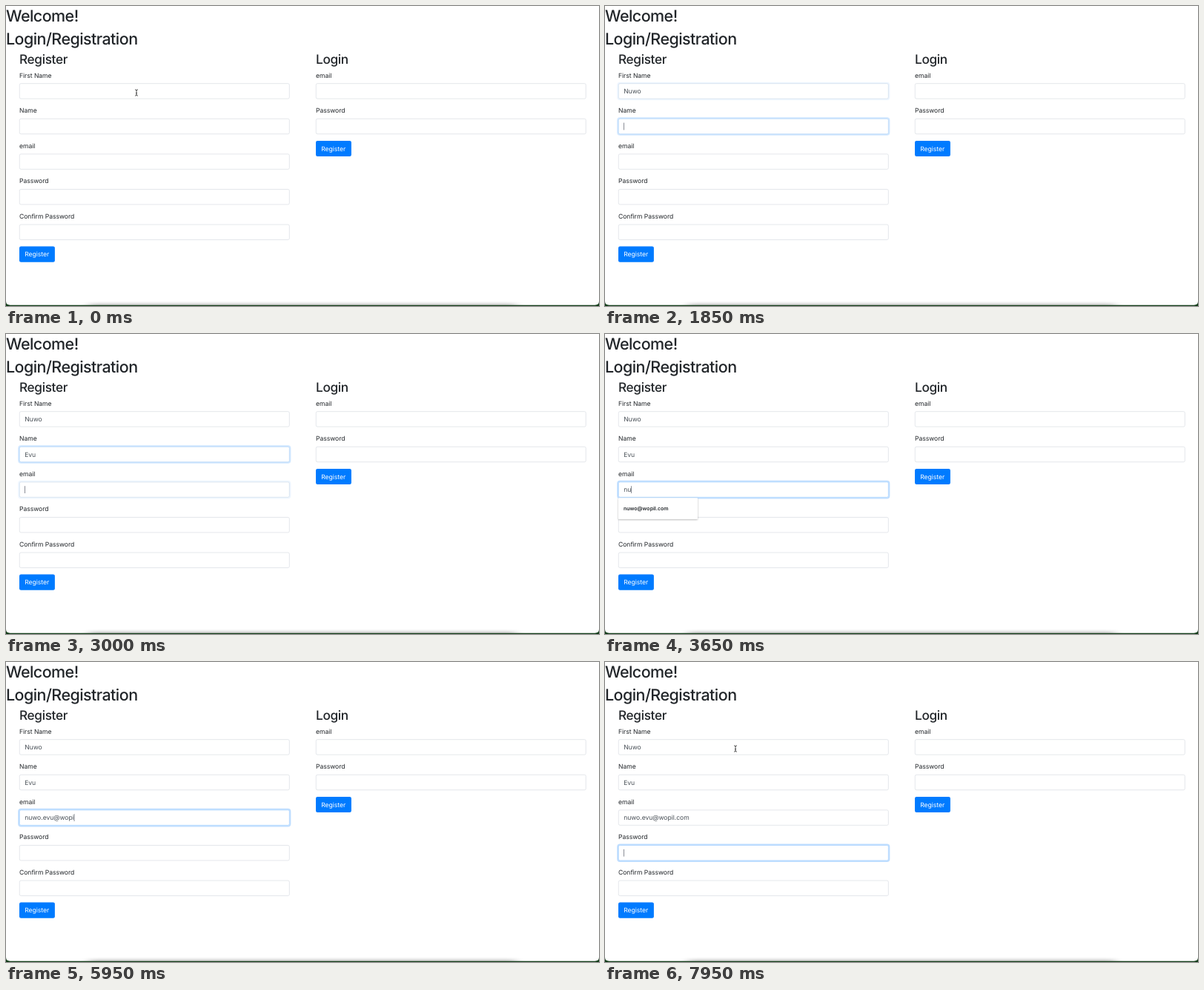
An HTML page for the animation above (8 s loop, 800 px wide and 405 px high).

```html
<!DOCTYPE html>
<html lang="en">
<head>
<meta charset="utf-8">
<title>Login and registration</title>
<style>
  html, body { margin: 0; width: 100%; height: 100%; overflow: hidden; background: #fff; }
  svg { display: block; width: 100%; height: 100%; }
  text {
    font: 400 8.6px Inter, "Open Sans", sans-serif;
    font-optical-sizing: none;
    letter-spacing: -.005em;
    fill: #212529;
    text-rendering: geometricPrecision;
    white-space: pre;
  }
  .h1 { font-size: 21.5px; font-weight: 500; letter-spacing: -.0265em; }
  .h2 { font-size: 17.2px; font-weight: 500; letter-spacing: -.019em; }
  .value { fill: #495057; }
  .btn { fill: #fff; }
  .hint { font-size: 7px; font-weight: 600; letter-spacing: 0; }
</style>
</head>
<body>
<svg id="stage" viewBox="0 0 800 405" preserveAspectRatio="none">
  <defs>
    <filter id="soft" x="-10%" y="-300%" width="120%" height="700%">
      <feGaussianBlur stdDeviation="7 2"/>
    </filter>
    <filter id="drop" x="-10%" y="-20%" width="120%" height="150%">
      <feDropShadow dx="0" dy=".8" stdDeviation="1.1" flood-color="#000" flood-opacity=".3"/>
    </filter>
    <clipPath id="page"><path d="M0 0H800V398.5Q800 403.7 794.5 403.7H5.5Q0 403.7 0 398.5Z"/></clipPath>
  </defs>
  <rect width="800" height="405" fill="#123c18"/>
  <g clip-path="url(#page)">
    <rect width="800" height="405" fill="#fff"/>
    <rect x="112" y="402.5" width="576" height="5" fill="#000" opacity=".32" filter="url(#soft)"/>
  </g>
</svg>
<script>
const LOOP = 8000, STEP = 50, FADE = 150;
const BLINK_ON = 450, BLINK = 800;
const TOP = 104.4, PITCH = 47.6, BOX_W = 364.6, BOX_H = 21.03, LINE = .55;
const stage = document.getElementById('stage');

function add(tag, attrs, text) {
  const el = document.createElementNS('http://www.w3.org/2000/svg', tag);
  for (const k in attrs) el.setAttribute(k, attrs[k]);
  if (text) el.textContent = text;
  stage.appendChild(el);
  return el;
}

const label = (x, y, text, cls = '') => add('text', { x, y, class: cls }, text);

function box(x, y, w, h, grow, attrs) {
  return add('rect', {
    x: x - grow, y: y - grow, width: w + 2 * grow, height: h + 2 * grow,
    rx: 2.2 + grow, fill: 'none', ...attrs
  });
}

function field(x, row, name) {
  const y = TOP + row * PITCH;
  label(x, y - 7.85, name);
  const ring = box(x, y, BOX_W, BOX_H, .885, { stroke: '#007bff', 'stroke-width': 1.77, 'stroke-opacity': 0 });
  const edge = box(x, y, BOX_W, BOX_H, -LINE / 2, { fill: '#fff', stroke: '#ced4da', 'stroke-width': LINE });
  const value = label(x + 7.2, y + 13.7, '', 'value');
  return { x, y, ring, edge, value };
}

function button(x, y) {
  box(x, y, 47.9, BOX_H, 0, { fill: '#007bff' });
  label(x + 7.2, y + 13.7, 'Register', 'btn');
}

label(0, 20.8, 'Welcome!', 'h1');
label(0, 51.8, 'Login/Registration', 'h1');
label(18, 78.2, 'Register', 'h2');
label(418, 78.2, 'Login', 'h2');

const form = ['First Name', 'Name', 'email', 'Password', 'Confirm Password'].map((n, i) => field(18, i, n));
button(18, 324.6);
['email', 'Password'].forEach((n, i) => field(418, i, n));
button(418, 181.9);

const caret = add('rect', { width: .6, height: 9.8, fill: '#3c4450' });

const popup = [
  add('rect', { x: 18, y: 221.2, width: 107, height: 28.8, rx: 1, fill: '#fff', filter: 'url(#drop)' }),
  label(25, 238.3, 'nuwo@wopil.com', 'hint')
];

const pointer = add('path', {
  d: 'M174 112.8Q176 112.8 176 114.3Q176 112.8 178 112.8M176 114V120M174 121.2Q176 121.2 176 119.7Q176 121.2 178 121.2M175 117.6H177',
  fill: 'none', stroke: '#222', 'stroke-width': .75
});

// When each field takes focus, and when each of its keys is pressed
const script = [
  { at: 0, text: 'Nuwo', keys: [650, 1050, 1150, 1350] },
  { at: 1750, text: 'Evu', keys: [2350, 2500, 2700] },
  { at: 2950, text: 'nuwo.evu@wopil.com', keys: [
    3500, 3650, 3700, 4150, 4750, 4900, 5000, 5150, 5350,
    5500, 5600, 5700, 5950, 6100, 6200, 6300, 6450, 6550] },
  { at: 6780, text: '', keys: [] }
];

const ease = (t, start) => {
  const p = Math.min(1, Math.max(0, (t - start) / FADE));
  return p * p * (3 - 2 * p);
};
const mix = (a, b, p) => 'rgb(' + a.map((v, i) => Math.round(v + (b[i] - v) * p)) + ')';
const show = (el, on) => el.setAttribute('visibility', on ? 'visible' : 'hidden');

function draw(t) {
  let active = 0;
  script.forEach((s, i) => {
    const f = form[i], next = script[i + 1];
    const p = ease(t, s.at) - (next ? ease(t, next.at) : 0);
    f.ring.setAttribute('stroke-opacity', .25 * p);
    f.edge.setAttribute('stroke', mix([206, 212, 218], [128, 189, 255], p));
    f.value.textContent = s.text.slice(0, s.keys.filter(k => k <= t).length);
    if (t > s.at) active = i;
  });

  const s = script[active], f = form[active];
  const last = Math.max(s.at, ...s.keys.filter(k => k <= t));
  const typed = f.value.textContent ? f.value.getComputedTextLength() : 0;
  caret.setAttribute('x', f.x + 7.2 + typed);
  caret.setAttribute('y', f.y + 5.6);
  show(caret, t > 0 && (t - last) % BLINK < BLINK_ON);

  popup.forEach(el => show(el, t >= 3550 && t < 4750));
  show(pointer, t < 650 || t >= 7900);
}

const begin = performance.now();
function tick() {
  const t = (performance.now() - begin) % LOOP;
  draw(Math.floor(t / STEP) * STEP);
  requestAnimationFrame(tick);
}
draw(0);
requestAnimationFrame(tick);
</script>
</body>
</html>
```
